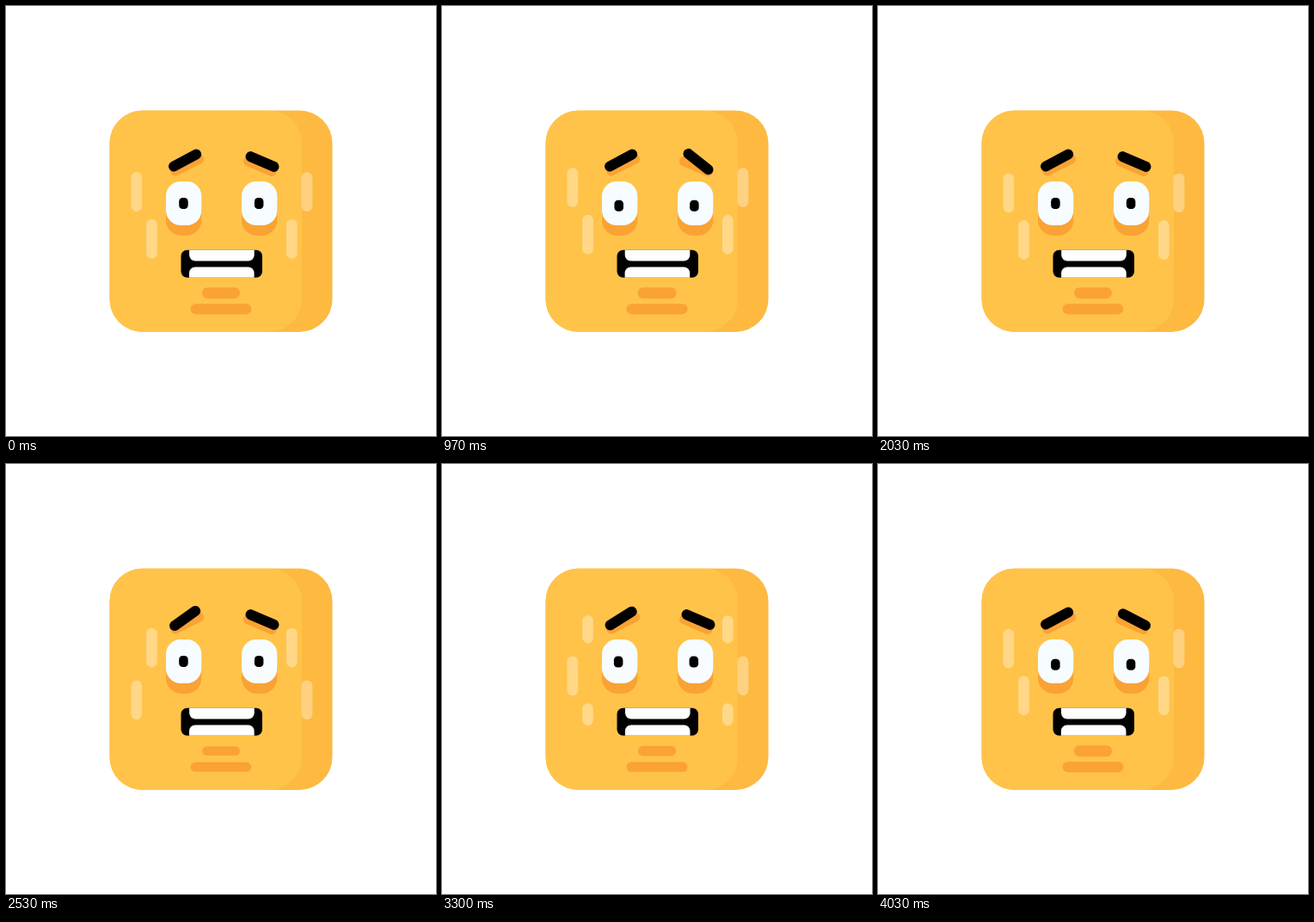
Animation of 500 by 500 pixels, one loop 4.06 s. Source, as an HTML page:

```html
<!DOCTYPE html>
<html lang="en">
<head>
<meta charset="utf-8">
<title>Nervous face</title>
<style>
  html, body { margin: 0; width: 100%; height: 100%; overflow: hidden; background: #fff; }
  svg { display: block; width: 100vw; height: 100vh; }
  .shade { fill: #faa233; stroke: #faa233; }
  .round { stroke-linecap: round; }
</style>
</head>
<body>
<svg viewBox="0 0 500 500">
  <defs>
    <clipPath id="faceClip"><rect x="120.5" y="121.5" width="259" height="257.5" rx="38"/></clipPath>
    <clipPath id="mouthClip"><rect x="203.5" y="283.8" width="94.5" height="32" rx="7"/></clipPath>
  </defs>

  <g clip-path="url(#faceClip)">
    <rect x="120" y="121" width="260" height="259" fill="#fdb940"/>
    <rect x="60" y="121.5" width="284" height="257.5" rx="38" fill="#ffc34a"/>
  </g>

  <g id="sweat" class="round" stroke="#fff" stroke-opacity=".34" stroke-width="12.7" fill="none"></g>

  <g class="round" stroke-width="12">
    <path class="shade" d="M197 191.500L224 178M282 180.500L309 192"/>
    <g stroke="#000">
      <path id="leftBrow" d="M193.300 179.500h29.600"/>
      <path id="rightBrow" d="M283.300 181h29.400"/>
    </g>
  </g>

  <g class="shade" stroke="none" style="stroke:none">
    <rect x="186" y="216" width="41.300" height="51" rx="18"/>
    <rect x="274" y="216" width="41.300" height="51" rx="18"/>
  </g>
  <g fill="#f6fcff">
    <rect x="186" y="204" width="41.300" height="51" rx="17"/>
    <rect x="274" y="204" width="41.300" height="51" rx="17"/>
  </g>
  <g id="pupils">
    <rect x="200.500" y="224.700" width="10.500" height="13" rx="4.300"/>
    <rect x="288.200" y="224.700" width="10.500" height="13" rx="4.300"/>
  </g>

  <g clip-path="url(#mouthClip)">
    <rect x="203" y="283" width="96" height="34"/>
    <g id="teeth" fill="#fff">
      <rect x="213.100" y="270" width="75.600" height="26.500" rx="7"/>
      <rect x="213" y="303.500" width="75.600" height="26.500" rx="7"/>
    </g>
  </g>

  <g class="shade" style="stroke:none">
    <rect id="chinTop"/>
    <rect id="chinBottom"/>
  </g>
</svg>
<script>
const LOOP = 4060, STEP = LOOP / 122;
const CYCLE = 1010;
const TRACK = 115.5, DROP = 33;
const TAU = Math.PI * 2;
const el = id => document.getElementById(id);

// Each drop is a dash that slides down its track and wraps to the top.
const drops = [[151.8, 17.3], [169.5, 72], [332.3, 72], [350, 17.3]].map(([x, start]) => {
  const line = document.createElementNS('http://www.w3.org/2000/svg', 'path');
  line.setAttribute('d', `M${x} 182.300v${TRACK}`);
  line.setAttribute('stroke-dasharray', `${DROP} ${TRACK - DROP}`);
  el('sweat').append(line);
  return { line, start };
});

const rotate = (id, angle, x, y) =>
  el(id).setAttribute('transform', `rotate(${angle} ${x} ${y})`);
const shift = (id, x, y) => el(id).setAttribute('transform', `translate(${x} ${y})`);
const clamp = v => Math.min(1, Math.max(0, v));

function bar(id, cx, cy, w, h) {
  const box = { x: cx - w / 2, y: cy - h / 2, width: w, height: h, rx: h / 2 };
  for (const key in box) el(id).setAttribute(key, box[key]);
}

function draw(time) {
  const phase = (time % CYCLE) / CYCLE;
  const shake = (phase * 2) % 1;
  const swell = (1 - Math.cos(TAU * phase)) / 2;
  const wave = Math.sin(TAU * shake);

  for (const { line, start } of drops) {
    const pos = (start + phase * TRACK) % TRACK;
    line.setAttribute('stroke-dashoffset', (TRACK - pos) % TRACK);
  }

  const rise = clamp((phase - 0.5) / 0.42);
  const fall = clamp((phase - 0.965) / 0.03);
  rotate('leftBrow', -28 - 7.5 * swell, 208.1, 179.5);
  rotate('rightBrow', 23.5 + 15 * rise * rise * (3 - 2 * rise) * (1 - fall), 298, 181);

  shift('pupils', 0.7 * Math.cos(3 * TAU * shake), -1.6 + 0.7 * shake + 3.4 * shake ** 6);
  shift('teeth', 0.8 * wave, 0);

  bar('chinTop', 250, 333.7, 44 - 2.3 * wave, 13 - 2.3 * swell);
  bar('chinBottom', 250, 352.3, 70.8 - wave, 12.2 - 1.2 * swell);
}

const began = performance.now();
function tick() {
  const time = (performance.now() - began) % LOOP;
  draw(Math.floor(time / STEP) * STEP);
  requestAnimationFrame(tick);
}
tick();
</script>
</body>
</html>
```
